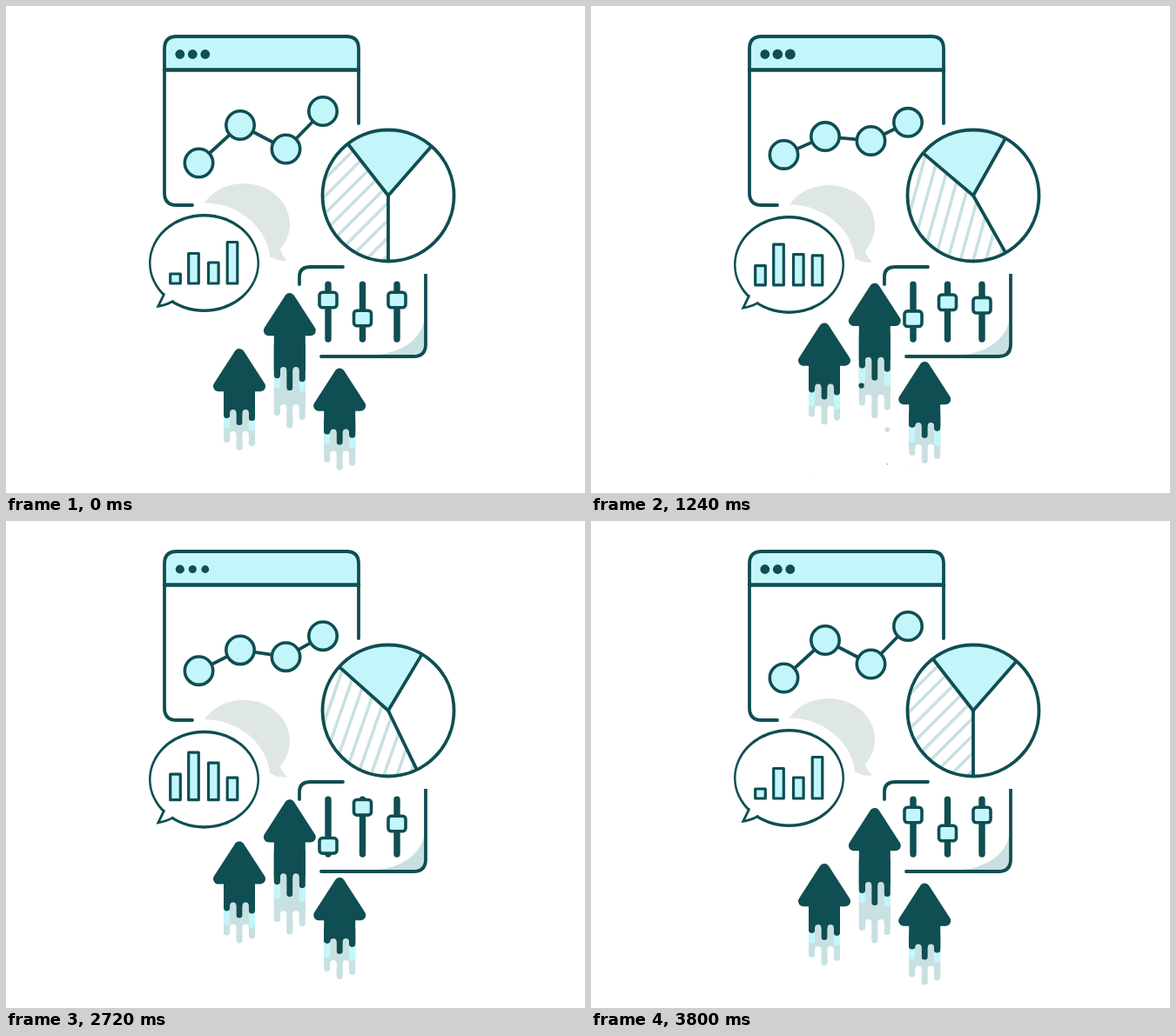
Write an HTML page that moves like this. It is 665 by 560 pixels and loops after 3.84 s.

```html
<!DOCTYPE html>
<html lang="en">
<head>
<meta charset="utf-8">
<title>Growth dashboard</title>
<style>
  html, body { margin: 0; width: 100%; height: 100%; overflow: hidden; background: #fff; }
  svg { display: block; width: 665px; height: 560px; }
  .ink { fill: none; stroke: #0f4e52; stroke-width: 3.8; stroke-linecap: round; stroke-linejoin: round; }
  .box { fill: #c3f6fb; stroke: #0f4e52; stroke-width: 3.6; stroke-linejoin: round; }
</style>
</head>
<body>
<svg id="stage" viewBox="0 0 665 560">
  <defs><clipPath id="half"><path d="M0-75A75 75 0 0 0 0 75Z"/></clipPath></defs>

  <g id="bubbles">
    <ellipse cx="273" cy="251" rx="53" ry="47" fill="#dfe7e6"/>
    <path d="M300 285Q309 294.500 323 292.500Q317 287 314.500 279Z" fill="#dfe7e6"/>
    <ellipse cx="227.500" cy="295.500" rx="76" ry="69" fill="#fff"/>
    <ellipse cx="227.500" cy="295.500" rx="63.500" ry="56.500" fill="#0f4e52"/>
    <ellipse cx="227.500" cy="295.500" rx="61" ry="53" fill="#fff"/>
    <path d="M181.500 331.500L174.800 345.300Q184 344 191.500 339.500L194 334L184 328Z" fill="#fff"/>
    <path class="ink" d="M181.500 331.500L174.800 345.300Q184 344 191.500 339.500" style="stroke-width:2.8;stroke-linejoin:miter"/>
    <g id="bars"></g>
  </g>

  <path d="M182 73.500V49Q182 35 196 35H391Q405 35 405 49V73.500Z" fill="#c3f6fb"/>
  <path class="ink" d="M405 135V49Q405 35 391 35H196Q182 35 182 49V215Q182 229 196 229H214"/>
  <path class="ink" d="M182 73.500H405" style="stroke-width:4.4"/>
  <g id="dots" fill="#0f4e52"></g>
  <path id="trend" class="ink"/>
  <g id="nodes"></g>

  <path d="M480 364Q470 396 425 401.500H468Q480 401.500 480 390Z" fill="#c9e0e2"/>
  <path class="ink" d="M337 320V311Q337 300 350 300H387"/>
  <path class="ink" d="M482 308V389Q482 403 468 403H361.500" style="stroke-linecap:butt"/>
  <path class="ink" d="M372 403H362"/>
  <g id="sliders"></g>

  <g transform="translate(439 218)">
    <circle r="75.500" fill="#fff"/>
    <g id="base">
      <path id="hatch" clip-path="url(#half)" fill="none" stroke="#c9e0e2" stroke-width="3.600"/>
      <path class="ink" d="M0 0V74"/>
    </g>
    <g id="wedge">
      <path d="M0 0L-46-59A75 75 0 0 1 49-56Z" fill="#c3f6fb"/>
      <path class="ink" d="M-46-59L0 0L49-56"/>
    </g>
    <circle class="ink" r="75.500"/>
  </g>

  <g id="arrows"></g>
  <g id="drops"></g>
</svg>
<script>
const LOOP = 3840, HALF = LOOP / 2;
const DARK = '#0f4e52', CYAN = '#c3f6fb', PALE = '#c9e0e2';
const $ = id => document.getElementById(id);

function add(parent, tag, attrs) {
  const el = document.createElementNS('http://www.w3.org/2000/svg', tag);
  for (const k in attrs) el.setAttribute(k, attrs[k]);
  return parent.appendChild(el);
}

// Symmetric cubic-bezier(a, 0, 1 - a, 1)
function ease(p, a) {
  if (p <= 0) return 0;
  if (p >= 1) return 1;
  let lo = 0, hi = 1, s;
  for (let i = 0; i < 24; i++) {
    s = (lo + hi) / 2;
    const x = 3 * a * s * (1 - s) ** 2 + 3 * (1 - a) * (1 - s) * s * s + s ** 3;
    if (x < p) lo = s; else hi = s;
  }
  return s * s * (3 - 2 * s);
}
const mix = (a, b, p) => a + (b - a) * p;

// x, height at rest, height when raised
const bars = [[194.5, 11, 29.5], [215.5, 34.5, 54.5], [238.3, 24, 42.5], [260, 47.5, 25.5]]
  .map(([x, h0, h1]) => ({ h0, h1, el: add($('bars'), 'rect',
    { class: 'box', x: x - 5.8, width: 11.6, style: 'stroke-width:3.2' }) }));

const dots = [199.8, 214.3, 228.8].map(cx => add($('dots'), 'circle', { cx, cy: 55.5 }));

const nodes = [[221.5, 180.5, 169.2], [269, 137, 152.5], [321.5, 164.5, 153.2], [364, 121, 136.2]]
  .map(([x, y0, y1]) => ({ x, y0, y1, el: add($('nodes'), 'circle', { class: 'box', cx: x, r: 16.2 }) }));

const knobs = [[370, 338, 373.3], [409.5, 359, 329.3], [449, 338, 348]].map(([x, y0, y1]) => {
  add($('sliders'), 'path', { class: 'ink', d: `M${x} 320.200V383`, style: 'stroke-width:7.4' });
  return { y0, y1, el: add($('sliders'), 'rect',
    { class: 'box', x: x - 10, width: 20, height: 17.6, rx: 3.5 }) };
});

let hatch = '';
for (let c = -112; c < 80; c += 20) hatch += `M-80 ${c + 80}L5 ${c - 5}`;
$('hatch').setAttribute('d', hatch);

const STRIP = 7.2;
function makeArrow(x, y, rise, gap, tips, notch, tails) {
  const g = add($('arrows'), 'g');
  const cap = STRIP / 2;
  const bar = (col, from, to, stroke) => add(g, 'path', {
    d: `M${col * STRIP} ${from}V${to - cap}`, stroke, 'stroke-width': STRIP, 'stroke-linecap': 'round' });
  add(g, 'rect', { x: -18, y: 60, width: 36, height: notch - 56, fill: PALE });
  [-2, 0, 2].forEach((c, i) => bar(c, 70, tails[i], PALE));
  [-1, 1].forEach(c => bar(c, notch + cap, notch + 12, '#fff'));
  const glow = [-2, 2].map(c => bar(c, 70, 90, CYAN));
  add(g, 'rect', { x: -18, y: 40, width: 36, height: gap - 36, fill: DARK });
  [-2, 0, 2].forEach((c, i) => bar(c, 60, tips[i], DARK));
  [-1, 1].forEach(c => bar(c, gap + cap, notch, PALE));
  add(g, 'path', { d: 'M0 6L-24 43.200H24Z', fill: DARK, stroke: DARK,
    'stroke-width': 12, 'stroke-linejoin': 'round' });
  return { g, x, y, rise, glow, ends: [tips[0], tips[2]] };
}
const arrows = [
  makeArrow(268, 394, 40, 70, [80, 88, 83], 95, [108, 117, 112]),
  makeArrow(325.8, 330, 15.3, 85, [98, 112, 102], 128, [141, 155.5, 146]),
  makeArrow(383.2, 416.5, 10.2, 70, [76, 88, 80], 95, [108, 117, 112])
];

// x, start, end, y from, y to, colour
const drops = [
  [340.3, 440, 1320, 424, 537, DARK],
  [310.6, 1040, 2240, 420, 519, DARK],
  [340.3, 840, 1983, 458, 541, PALE],
  [325.6, 1500, 2280, 456, 535, CYAN],
  [268.2, 340, 840, 480, 530, DARK],
  [253.8, 640, 1290, 486, 544, PALE],
  [383.4, 700, 1280, 496, 526, DARK],
  [369, 700, 1290, 505, 536, PALE]
].map(([cx, t0, t1, y0, y1, fill]) => ({ t0, t1, y0, y1, el: add($('drops'), 'circle', { cx, fill }) }));

// Shrink, overshoot, settle
function pulse(t) {
  const steps = [[360, 5.4], [600, 4.4], [1040, 6], [1260, 5.4]];
  if (t <= 360 || t >= 1260) return 5.4;
  const i = steps.findIndex(s => s[0] > t);
  const [ta, ra] = steps[i - 1], [tb, rb] = steps[i];
  return mix(ra, rb, ease((t - ta) / (tb - ta), .42));
}

function draw(t) {
  const p = t < HALF ? t / HALF : (LOOP - t) / HALF;
  const back = t >= HALF, phase = t % HALF;
  const soft = back ? 1 - ease(1 - p, .42) : ease(p, .42);
  const firm = ease(p, .7);
  const step = ease((phase - 855) / 680, .42);
  const set = back ? 1 - step : step;

  $('bubbles').setAttribute('transform', `translate(0 ${2.6 * soft})`);
  for (const b of bars) {
    const h = mix(b.h0, b.h1, set);
    b.el.setAttribute('y', 319 - h);
    b.el.setAttribute('height', h);
  }
  dots.forEach((d, i) => d.setAttribute('r', pulse(phase - i * 110)));

  const line = nodes.map(n => {
    const y = mix(n.y0, n.y1, firm);
    n.el.setAttribute('cy', y);
    return n.x + ' ' + y;
  });
  $('trend').setAttribute('d', 'M' + line.join('L'));
  $('base').setAttribute('transform', `rotate(${-35 * firm})`);
  $('wedge').setAttribute('transform', `rotate(${-14 * firm})`);

  for (const k of knobs) k.el.setAttribute('y', mix(k.y0, k.y1, set) - 8.8);

  for (const a of arrows) {
    a.g.setAttribute('transform', `translate(${a.x} ${a.y - a.rise * soft})`);
    a.glow.forEach((el, i) => el.setAttribute('d',
      `M${(i ? 2 : -2) * STRIP} 70V${a.ends[i] + 8 + 7 * soft}`));
  }
  for (const d of drops) {
    const q = (t - d.t0) / (d.t1 - d.t0);
    d.el.setAttribute('r', q > 0 && q < 1 ? 3.2 * (1 - q * q) : 0);
    d.el.setAttribute('cy', mix(d.y0, d.y1, q));
  }
}

const start = performance.now();
function tick() {
  draw((performance.now() - start) % LOOP);
  requestAnimationFrame(tick);
}
tick();
</script>
</body>
</html>
```
